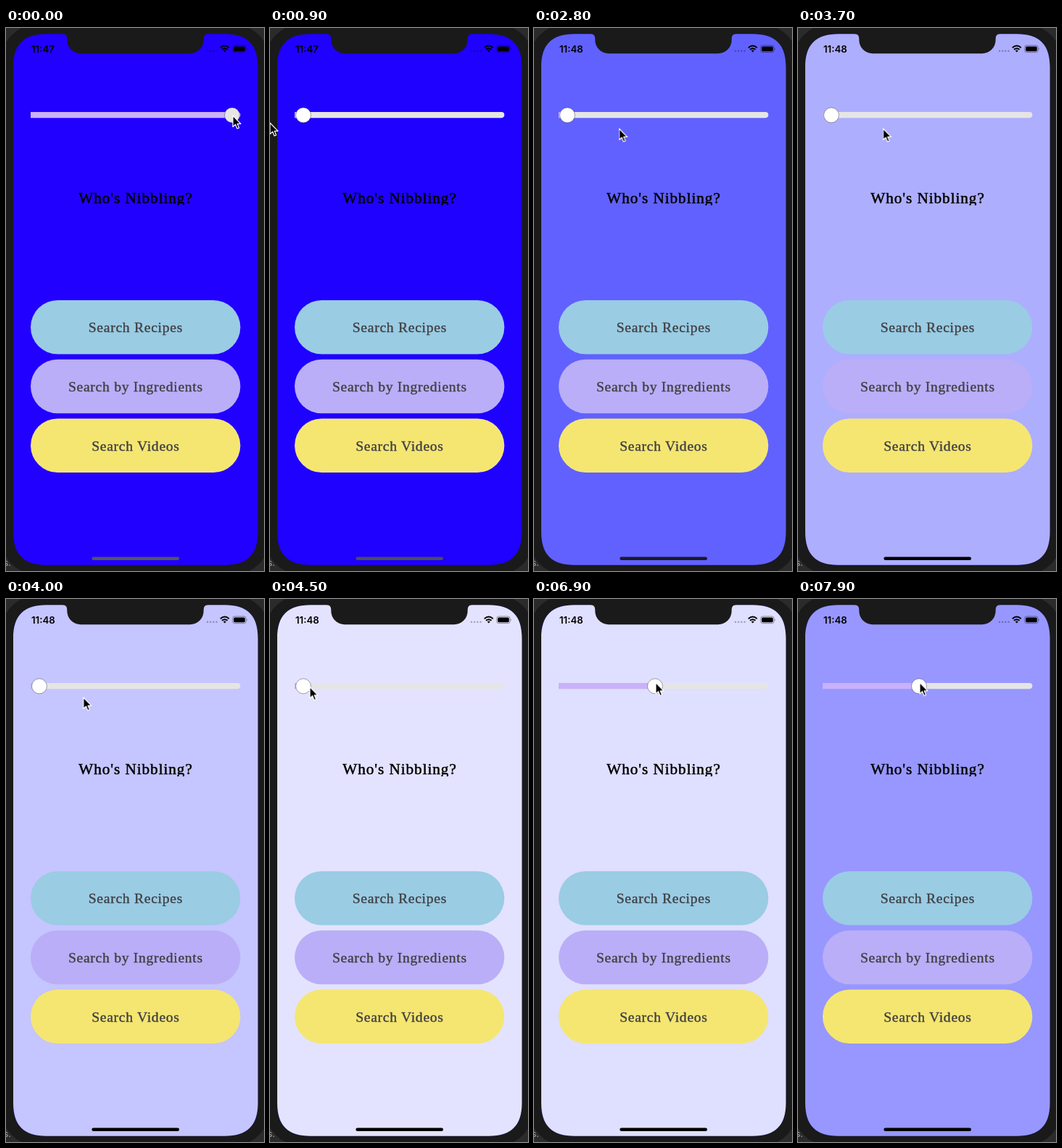
An HTML page that plays this animation: 356x750 px, repeating every 8 s.

```html
<!DOCTYPE html>
<html lang="en">
<head>
<meta charset="utf-8">
<title>Recipe app home</title>
<style>
  html, body { margin: 0; width: 100%; height: 100%; overflow: hidden; background: #2b2b2c; }
  svg { display: block; width: 356px; height: 750px; }

  .base, .fade, .slide, .thumb, .cursor, .home, .clock { animation: 8s linear infinite; }
  .base { animation-name: base; }
  .fade { animation-name: fade; }
  .slide { animation-name: slide; }
  .thumb { animation-name: press; stroke: rgba(70, 70, 80, .5); stroke-width: .8; filter: drop-shadow(0 .6px .6px rgba(0, 0, 0, .25)); }
  .cursor { animation-name: cursor; }
  .home { animation-name: home; }
  .clock { animation-name: early; font: 600 13.3px Inter, sans-serif; }
  .clock.late { animation-name: late; }

  .label { font: 19.6px "Liberation Serif", serif; letter-spacing: .72px; text-anchor: middle; fill: #404043; stroke: #404043; stroke-width: .4; }
  .title { font-size: 21.2px; letter-spacing: .95px; fill: #000; stroke: #000; stroke-width: .5; }

  @keyframes base {
    0%, 8.1% { fill: #20f; }
    35%, 100% { fill: #00f; }
  }
  /* five second ease to white, then the start of the same ease back */
  @keyframes fade {
    0%, 8.1% { opacity: 0; animation-timing-function: ease-in-out; }
    70.6% { opacity: 1; animation-timing-function: linear; }
    71.25% { opacity: 1; animation-timing-function: cubic-bezier(.415, 0, .712, .481); }
    100% { opacity: .56; }
  }
  @keyframes slide {
    0%, 1.5% { transform: translateX(312px); animation-timing-function: ease-in-out; }
    8%, 67.5% { transform: translateX(46px); }
    71.25% { transform: translateX(136.5px); }
    73.2%, 100% { transform: translateX(167px); }
  }
  @keyframes press {
    0%, 7.5% { fill: #e6e6e6; }
    9%, 66% { fill: #fff; }
    67.5%, 74% { fill: #dcdcdc; }
    76%, 100% { fill: #fff; }
  }
  @keyframes cursor {
    0%, 1.5% { transform: translate(313px, 121px); animation-timing-function: ease-in-out; }
    8% { transform: translate(36px, 127px); }
    10%, 23% { transform: translate(0, 131px); animation-timing-function: ease-in-out; }
    33%, 48% { transform: translate(117.5px, 139px); animation-timing-function: ease-in-out; }
    55%, 67% { transform: translate(55px, 121.5px); }
    71.25% { transform: translate(162px, 134px); }
    74% { transform: translate(176px, 130px); animation-timing-function: ease-in-out; }
    80%, 100% { transform: translate(168px, 115.5px); }
  }
  @keyframes home {
    0%, 8% { fill: #55555f; }
    21.5% { fill: #333350; }
    35% { fill: #1a1a2a; }
    46%, 100% { fill: #000; }
  }
  @keyframes early {
    0%, 27.49% { opacity: 1; }
    27.5%, 100% { opacity: 0; }
  }
  @keyframes late {
    0%, 27.49% { opacity: 0; }
    27.5%, 100% { opacity: 1; }
  }
</style>
</head>
<body>
<svg viewBox="0 0 356 750">
  <defs>
    <clipPath id="track"><path d="M34 116H319.3a4.1 4.1 0 0 1 0 8.2H34z"/></clipPath>
    <clipPath id="titleBox"><rect x="80" y="215" width="200" height="30"/></clipPath>
    <!-- smooth corners: 46 long, handles 14.5 from the corner -->
    <path id="screen" d="M56 8.3H301.6c31.5 0 46 14.5 46 46V695.7c0 31.5-14.5 46-46 46H56c-31.5 0-46-14.5-46-46V54.3c0-31.5 14.5-46 46-46z"/>
    <rect id="pill" x="34" width="289.4" height="74.6" rx="37.3"/>
  </defs>

  <rect width="356" height="750" fill="#2b2b2c"/>
  <text x="-3" y="743" font-family="Inter, sans-serif" font-size="12" fill="#aaa">s.</text>
  <rect x="-8" y="-6" width="373" height="762" rx="54" fill="#1a1a1a"/>

  <use href="#screen" class="base"/>
  <use href="#screen" class="fade" fill="#fff"/>
  <path d="M78 8q6.3 0 6.3 7v1.5a18.7 18.7 0 0 0 18.7 18.7H254a18.7 18.7 0 0 0 18.7-18.7V15q0-7 6.3-7z" fill="#1a1a1a"/>

  <!-- status bar -->
  <text class="clock" x="35" y="33.6">11:47</text>
  <text class="clock late" x="35" y="33.6">11:48</text>
  <path d="M278 31.7h14" stroke="#000" stroke-opacity=".28" stroke-width="2.6" stroke-linecap="round" stroke-dasharray="0 4.2"/>
  <g fill="none" stroke="#000" stroke-width="1.9">
    <path d="M295.8 27.2q6-5.2 12 0M298 29.8q3.8-3.2 7.6 0"/>
    <path d="M299.8 31.3q2-1.4 4 0l-2 2.2z" fill="#000" stroke="none"/>
  </g>
  <rect x="312.8" y="24" width="18.4" height="9.6" rx="2.8" fill="none" stroke="#000" stroke-opacity=".4"/>
  <rect x="314.2" y="25.4" width="15.6" height="6.8" rx="1.6"/>
  <path d="M332.4 27.2q1.6 1.6 0 3.2z" fill-opacity=".45"/>

  <!-- slider -->
  <g clip-path="url(#track)">
    <rect x="34" y="116" width="290" height="9" fill="#e5e5e6"/>
    <g class="slide"><rect x="-300" y="116" width="300" height="9" fill="#c9b1fb"/></g>
  </g>
  <g class="slide"><circle class="thumb" cy="120.4" r="10.4"/></g>

  <g clip-path="url(#titleBox)">
    <text class="label title" x="179" y="242">Who's Nibbling?</text>
  </g>

  <use href="#pill" y="375.9" fill="#9acce4"/>
  <use href="#pill" y="457.7" fill="#baaef8"/>
  <use href="#pill" y="539.4" fill="#f5e672"/>
  <text class="label" x="178.9" y="420">Search Recipes</text>
  <text class="label" x="178.9" y="501.8">Search by Ingredients</text>
  <text class="label" x="178.9" y="583.6">Search Videos</text>

  <rect class="home" x="118.4" y="730.4" width="120.6" height="4.5" rx="2.2"/>

  <g class="cursor">
    <path d="M0 0V15.5L3.6 12.2 6 18 8.6 17 6.2 11.3H11z" stroke="#fff" stroke-width="1.2" stroke-linejoin="round"/>
  </g>
</svg>
</body>
</html>
```
